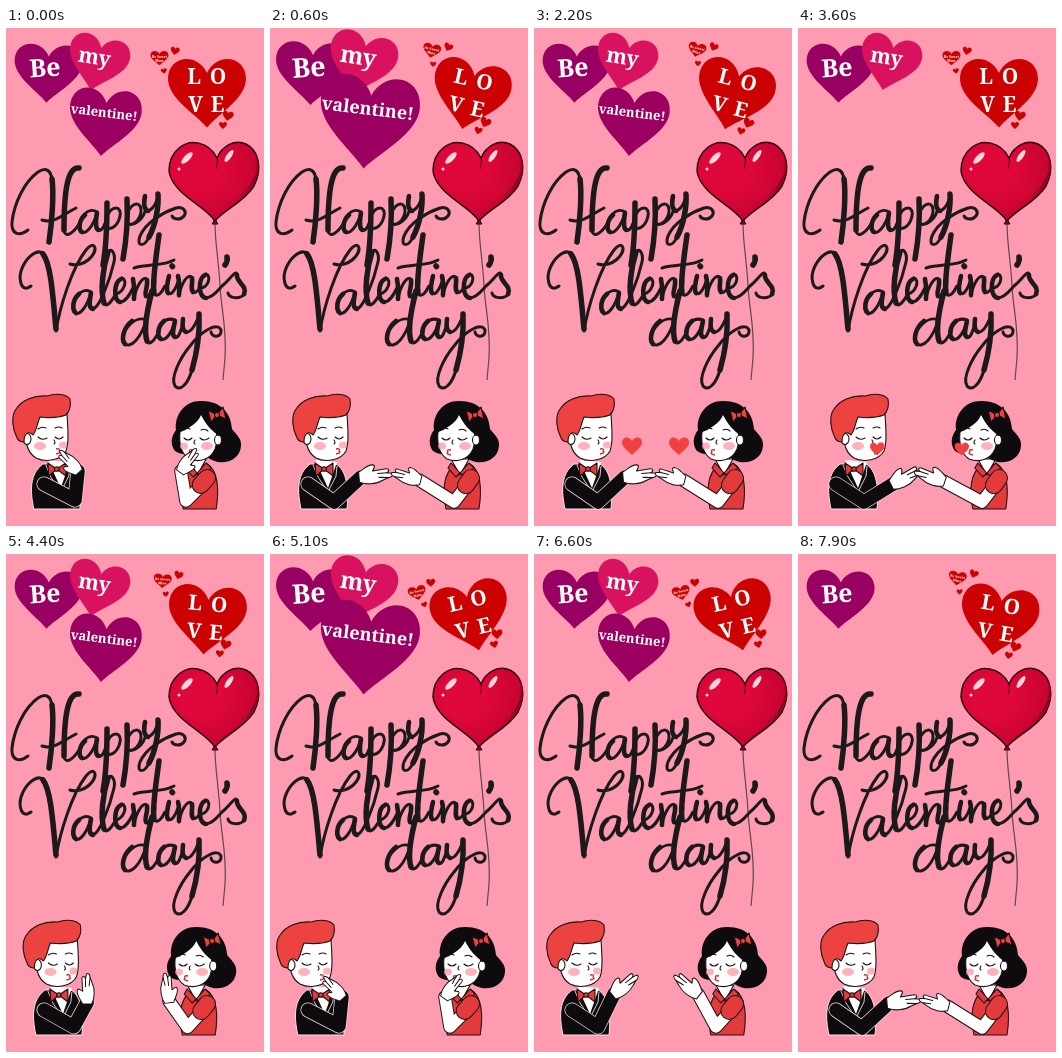
Animation, 258 px wide and 498 px high, one loop 8000 ms. Source, as an HTML page:

```html
<!DOCTYPE html>
<html lang="en">
<head>
<meta charset="utf-8">
<title>Happy Valentine's day</title>
<style>
  html, body { margin: 0; width: 100%; height: 100%; overflow: hidden; background: #ff9bb0; }
  svg { display: block; width: 100vw; height: 100vh; }
  text { font-family: "Noto Serif", "Liberation Serif", serif; font-weight: 700; fill: #fff; text-anchor: middle; }
  .pen { fill: none; stroke: #1c191b; stroke-linecap: round; stroke-linejoin: round; }
  .ink { stroke: #1c1214; stroke-width: 1.1; stroke-linejoin: round; stroke-linecap: round; }
  .line { fill: none; }
  .skin { fill: #fff; }
  .red { fill: #e33b3b; }
  .blush { fill: #ff9fa8; opacity: .8; }
  .arm { fill: none; stroke-linecap: round; stroke-linejoin: round; }
</style>
</head>
<body>
<svg viewBox="0 0 258 498" preserveAspectRatio="none">
  <defs>
    <path id="heart" d="M0 .9C-.3 .55-1 .15-1-.35C-1-.95-.25-1.05 0-.5C.25-1.05 1-.95 1-.35C1 .15 .3 .55 0 .9Z"/>
    <g id="palm">
      <path class="ink skin" d="M-2-5C4-8 8-12 13-11C16-10 13-7 12-5L26-6C29-6 29-3 26-2L31-1C33 1 30 3 27 3L22 5C14 9 4 8-2 5Z"/>
      <path class="ink line" d="M17-2L26-2M18 2L27 3"/>
    </g>
    <radialGradient id="rubber" cx=".35" cy=".35" r=".75">
      <stop offset=".3" stop-color="#e0083a"/><stop offset="1" stop-color="#c0022c"/>
    </radialGradient>
    <clipPath id="floor"><rect width="258" height="482"/></clipPath>
  </defs>

  <!-- word hearts -->
  <g id="be">
    <use href="#heart" fill="#980061" transform="translate(42 45) rotate(3) scale(34 33)"/>
    <text font-size="25" transform="translate(39.500 48.500) rotate(-4)">Be</text>
  </g>
  <g id="my">
    <use href="#heart" fill="#d8125f" transform="translate(91.500 35) rotate(14) scale(30.500 31)"/>
    <text font-size="21" transform="translate(87.500 36) rotate(9)">my</text>
  </g>
  <g id="valentine">
    <use href="#heart" fill="#9b0061" transform="translate(98.500 94) rotate(6) scale(36 38)"/>
    <text font-size="13" transform="translate(97.500 89) rotate(7)">valentine!</text>
  </g>

  <g id="love">
    <g fill="#cc0202">
      <use href="#heart" transform="translate(201 64.500) scale(39)"/>
      <use href="#heart" transform="translate(153.500 30) scale(9 8)"/>
      <use href="#heart" transform="translate(169 23) rotate(10) scale(4.500)"/>
      <use href="#heart" transform="translate(158 43) rotate(-10) scale(3)"/>
      <use href="#heart" transform="translate(222 88) rotate(10) scale(5.500)"/>
      <use href="#heart" transform="translate(217 97.500) scale(4)"/>
    </g>
    <g font-size="21">
      <text x="188" y="56">L</text><text x="212" y="56">O</text>
      <text x="189.500" y="84">V</text><text x="211.500" y="84">E</text>
    </g>
    <g font-size="3.400"><text x="153.500" y="29.500">Be Sweet</text><text x="153.500" y="33.500">Mine</text></g>
  </g>

  <!-- balloon -->
  <path class="line" stroke="#5d4850" stroke-width="1.200" d="M209 195C209 215 213 235 214 258C215 280 221 300 219 330L217 352"/>
  <path d="M209 191L206 196L212 196Z" fill="#a80024" stroke="#2b0710"/>
  <path fill="url(#rubber)" stroke="#2b0710" stroke-width="1.500" d="M209 193C200 178 166 166 163 143C163 122 180 112 192 115C202 117 208 124 211 130C216 118 228 111 240 116C254 123 256 142 248 158C238 174 218 182 209 193Z"/>
  <path fill="#a90024" d="M210 191C218 179 242 172 249 148C251 140 251 131 249 125C254 133 254 146 247 158C237 173 218 181 210 191Z"/>
  <path class="line" stroke="#4b0717" d="M251 146L244 158M246 156L234 168M211 130C212 134 211 138 210 141"/>
  <g fill="#ffd3da">
    <ellipse cx="181" cy="130" rx="7.500" ry="3" transform="rotate(-45 181 130)"/>
    <ellipse cx="223" cy="128" rx="7" ry="2.500" transform="rotate(-55 223 128)"/>
    <circle cx="173" cy="141" r="1.500"/>
  </g>

  <!-- lettering: hairlines, then heavy downstrokes -->
  <g class="pen" stroke-width="3">
    <path d="M22 202C13 209 5 206 6 194C8 176 18 154 32 144C40 139 45 142 46 152M36 192C48 196 58 186 70 180M58 203C60 211 68 204 73 196"/>
    <path d="M91 184C82 178 72 190 74 202C78 210 88 198 91 184M94 202C97 202 99 196 101 190M100 190C106 176 116 178 114 188C112 198 105 202 101 200M121 186C127 172 136 174 135 184C133 194 126 198 122 196C130 198 138 190 140 180"/>
    <path d="M139 180C142 186 148 180 151 172M143 209C138 220 130 218 134 208C140 194 158 184 170 180C178 178 181 184 178 188C175 192 168 192 166 188"/>
    <path d="M25 258C15 266 11 250 17 238C22 228 32 220 38 226M50 303C54 278 66 240 80 222C88 212 92 220 86 228C80 236 70 238 64 236"/>
    <path d="M85 264C76 258 64 272 68 284C74 290 82 276 85 264M86 280C92 284 104 252 108 234C110 224 104 218 101 226M98 276C102 280 107 270 110 266C118 264 122 252 116 250M114 274C120 274 124 266 127 260"/>
    <path d="M128 271C130 258 138 246 141 252M140 268C142 272 146 262 149 254M128 240C142 236 158 238 168 232M148 266C152 270 156 264 159 258M161 264C165 270 170 260 172 254"/>
    <path d="M173 268C175 256 182 244 186 250M186 262C188 268 192 262 194 260C202 260 206 248 200 246M200 270C208 269 212 262 216 258C224 252 229 242 231 246M239 266C233 272 223 270 222 265"/>
    <path d="M140 292C130 287 114 302 117 314C124 324 136 308 140 292M141 314C146 318 150 308 153 304M169 292C158 288 150 300 153 310C160 316 167 302 169 292M168 308C172 314 176 300 177 294"/>
    <path d="M178 302C182 308 188 300 192 290M186 342C182 356 174 364 169 358C164 350 174 330 184 318C196 302 212 294 215 302C216 310 206 310 205 304"/>
  </g>
  <g class="pen" stroke-width="5.500">
    <path d="M46 151C48 166 46 194 43 214M73 140C61 138 58 166 58 202M101 175C101 196 100 220 97 237M121 171C122 190 120 214 117 231M152 166C153 180 149 198 143 209"/>
    <path d="M37 226C45 236 47 270 50 301M102 224C97 240 94 262 98 275M153 207C150 230 146 254 148 265M166 238l.5 .5M221 229q1 4-2 8"/>
    <path d="M146 263C140 286 138 304 141 313M193 286C194 306 190 328 186 342"/>
  </g>
  <g class="pen" stroke-width="4.600">
    <path d="M79 187C73 192 72 202 76 204M91 185C89 196 90 202 93 202M139 168C137 178 139 182 142 183"/>
    <path d="M73 266C66 272 66 282 70 285M85 265C83 276 83 280 87 281M115 251C108 254 107 272 114 274M127 251C129 260 128 266 128 271M141 252C142 258 138 266 140 268M163 248C161 256 160 262 162 265"/>
    <path d="M172 248C174 256 173 262 173 267M186 250C187 256 184 260 187 264M199 247C192 250 192 269 200 270M231 247C230 254 242 258 238 266"/>
    <path d="M126 293C117 300 115 312 119 316M158 293C151 299 151 309 155 311M169 293C167 302 166 308 169 309M177 291C176 299 177 303 180 304"/>
  </g>

  <!-- couple -->
  <g clip-path="url(#floor)">
    <g id="manBody">
      <path d="M31 481C27 462 27 446 40 436L66 436C77 442 79 462 77 481Z" fill="#0d0b0d" stroke="#fbe3e7"/>
      <path d="M45 432L58 460L67 434Z" fill="#fff"/>
      <path class="line" stroke="#fff" stroke-width=".8" d="M43 437L48 449L58 464L66 448L67 438"/>
      <path class="ink red" d="M54 441L45 435L46 448ZM54 441L63 435L63 448Z"/>
      <circle class="ink red" cx="54" cy="441" r="2.300"/>
    </g>
    <g id="manHead">
      <path class="ink skin" d="M37 398C34 410 36 424 46 430C56 435 71 432 76 423C79 414 78 402 77 386L46 384Z"/>
      <ellipse class="ink skin" cx="37" cy="411" rx="4" ry="5.500"/>
      <ellipse class="blush" cx="50" cy="418" rx="6" ry="4"/><ellipse class="blush" cx="73" cy="417" rx="4" ry="3.500"/>
      <path class="ink" fill="#ec4240" d="M27 410C22 400 21 388 26 381C32 372 44 367 57 368C66 365 76 366 80 371C81 377 80 383 76 387C68 390 58 390 50 389C47 396 47 402 43 407C38 402 34 406 34 414C30 414 28 412 27 410Z"/>
      <path class="ink line" d="M48 409q4 4 9 1M65 409q4 4 8 0M48 401q4-3 8-1M65 400q4-2 7 0M64 412q2 3 0 4"/>
      <path class="line" stroke="#d22b30" stroke-width="1.300" d="M66 421q5-1 3 2q3 2-3 3"/>
    </g>
    <path id="manEdge" class="arm" stroke="#f7d3d9" stroke-width="15"/>
    <path id="manArm" class="arm" stroke="#0d0b0d" stroke-width="13.500"/>
    <use id="manHand" href="#palm"/>

    <g id="girlBody">
      <path class="ink red" d="M176 481C172 462 174 446 184 437L200 436C211 442 212 462 209 481Z"/>
      <path class="ink skin" d="M181 431L190 447L199 431Z"/>
      <path class="ink red" d="M181 435L190 445L186 449L178 440ZM199 435L190 445L195 449L204 440Z"/>
    </g>
    <g id="girlHead">
      <path fill="#0d0b0d" d="M190 373C174 372 162 386 164 402C159 408 158 417 163 423C170 428 180 426 185 424L200 432C212 438 228 432 229 418C230 411 224 406 220 401C219 384 208 373 190 373Z"/>
      <path class="ink skin" d="M169 398C166 412 168 425 177 431C188 435 199 431 203 421C207 410 204 396 198 386L178 386Z"/>
      <ellipse class="ink skin" cx="206" cy="412" rx="3.500" ry="5"/>
      <ellipse class="blush" cx="172" cy="418" rx="4" ry="3.500"/><ellipse class="blush" cx="195" cy="418" rx="6" ry="4"/>
      <path d="M166 405C176 401 186 395 189 387C194 397 200 403 207 408L213 395C208 378 196 374 188 375C172 376 163 390 166 405Z" fill="#0d0b0d"/>
      <path class="ink line" d="M172 410q4 4 8 0M188 410q4 4 9 0M172 402q3-3 6-1M189 402q4-2 7 1M183 412q-2 3 0 4"/>
      <path class="line" stroke="#d22b30" stroke-width="1.300" d="M181 422q-5-1-3 2q-3 2 3 3"/>
      <path class="ink" fill="#ec4240" d="M205 387L196 382L199 394ZM205 387L211 379L214 391Z"/>
      <circle class="ink" cx="205" cy="387" r="2.500" fill="#ec4240"/>
    </g>
    <path id="girlEdge" class="arm" stroke="#1c1214" stroke-width="13.500"/>
    <path id="girlArm" class="arm" stroke="#fff" stroke-width="11.500"/>
    <path id="girlCuff" class="arm" stroke="#1c1214" stroke-width="18"/>
    <path id="girlSleeve" class="arm" stroke="#e33b3b" stroke-width="16"/>
    <use id="girlHand" href="#palm"/>
  </g>
  <use id="kissR" href="#heart" fill="#f0403f"/>
  <use id="kissL" href="#heart" fill="#f0403f"/>
</svg>

<script>
const LOOP = 8000, STEP = 100, WORDS = 4500, BEAT = 900, SWING = 1800, SCENE = 6400;
const el = id => document.getElementById(id);
const set = (id, name, value) => el(id).setAttribute(name, value);
const move = (id, value) => set(id, 'transform', value);
const clamp = v => Math.max(0, Math.min(1, v));

// head shift, elbow x/y, wrist x/y, hand angle, hand scale
const MAN = {
  kiss:  [-16, 69, 472, 72, 443, -132, .85],
  lift:  [-10, 64, 473, 80, 440, -38, .95],
  offer: [0, 64, 474, 91, 449, -5, 1],
  touch: [10, 66, 474, 95, 456, -26, 1]
};
const GIRL = {
  kiss:  [6, 180, 473, 175, 443, 305, .85],
  lift:  [4, 182, 473, 164, 440, 218, .95],
  offer: [0, 184, 474, 149, 452, 194, .9],
  touch: [-6, 184, 474, 145, 453, 198, .95]
};
const KEYS = [[0, 'kiss'], [200, 'lift'], [450, 'offer'], [2900, 'offer'],
  [3400, 'touch'], [4100, 'touch'], [4600, 'kiss'], [SCENE, 'kiss']];

function poseAt(poses, s) {
  const i = KEYS.findIndex(k => k[0] > s);
  const [t0, a] = KEYS[i - 1], [t1, b] = KEYS[i];
  const p = (s - t0) / (t1 - t0);
  return poses[a].map((v, j) => v + (poses[b][j] - v) * p);
}

function drawPerson(name, pose, shoulder, flip) {
  const [dx, ex, ey, wx, wy, angle, size] = pose;
  const [sx, sy] = shoulder;
  const arm = `M${sx} ${sy}L${ex} ${ey}L${wx} ${wy}`;
  move(name + 'Head', `translate(${dx} 0)`);
  move(name + 'Body', `translate(${dx * .2} 0)`);
  set(name + 'Edge', 'd', arm);
  set(name + 'Arm', 'd', arm);
  move(name + 'Hand', `translate(${wx} ${wy}) rotate(${angle}) scale(${size} ${flip * size})`);
}

function drawCouple(s) {
  const girl = poseAt(GIRL, s);
  drawPerson('man', poseAt(MAN, s), [38, 456], 1);
  drawPerson('girl', girl, [201, 452], -1);
  const sleeve = `M201 450L${201 + (girl[1] - 201) * .3} ${450 + (girl[2] - 450) * .3}`;
  set('girlCuff', 'd', sleeve);
  set('girlSleeve', 'd', sleeve);

  // blown kisses cross over to the other face
  const x = 98 + (s - 2200) * .047;
  const y = 418 + clamp((s - 2200) / 1400) * 3;
  const size = 10 * clamp((s - 1800) / 300) * clamp((4500 - s) / 1250) * (s < 3800);
  move('kissR', `translate(${x} ${y}) scale(${size})`);
  move('kissL', `translate(${243 - x} ${y}) scale(${size})`);
}

function drawWord(id, u, start, cx, cy, swell) {
  const b = u % BEAT;
  const beat = b < 600 ? clamp((b - 500) / 100) : (BEAT - b) / 300;
  let k = 1;
  if (u < 2700) k = u < 2600 ? 1 + swell * beat : .5;
  else {
    const p = clamp((u - start) / 200);
    k = p * (1 + .5 * (1 - p));
  }
  move(id, `translate(${cx} ${cy}) scale(${k}) translate(${-cx} ${-cy})`);
}

function draw(t) {
  const u = t % WORDS;
  drawWord('be', u, 2900, 41, 45, .08);
  drawWord('my', u, 3400, 91, 34, .12);
  drawWord('valentine', u, 3800, 98.5, 95, .38);
  move('love', `rotate(${15 * Math.sin(2 * Math.PI * t / SWING)} 190 62)`);
  drawCouple(t % SCENE);
}

const begin = performance.now();
function tick() {
  const t = (performance.now() - begin) % LOOP;
  draw(Math.floor(t / STEP) * STEP);
  requestAnimationFrame(tick);
}
tick();
</script>
</body>
</html>
```
